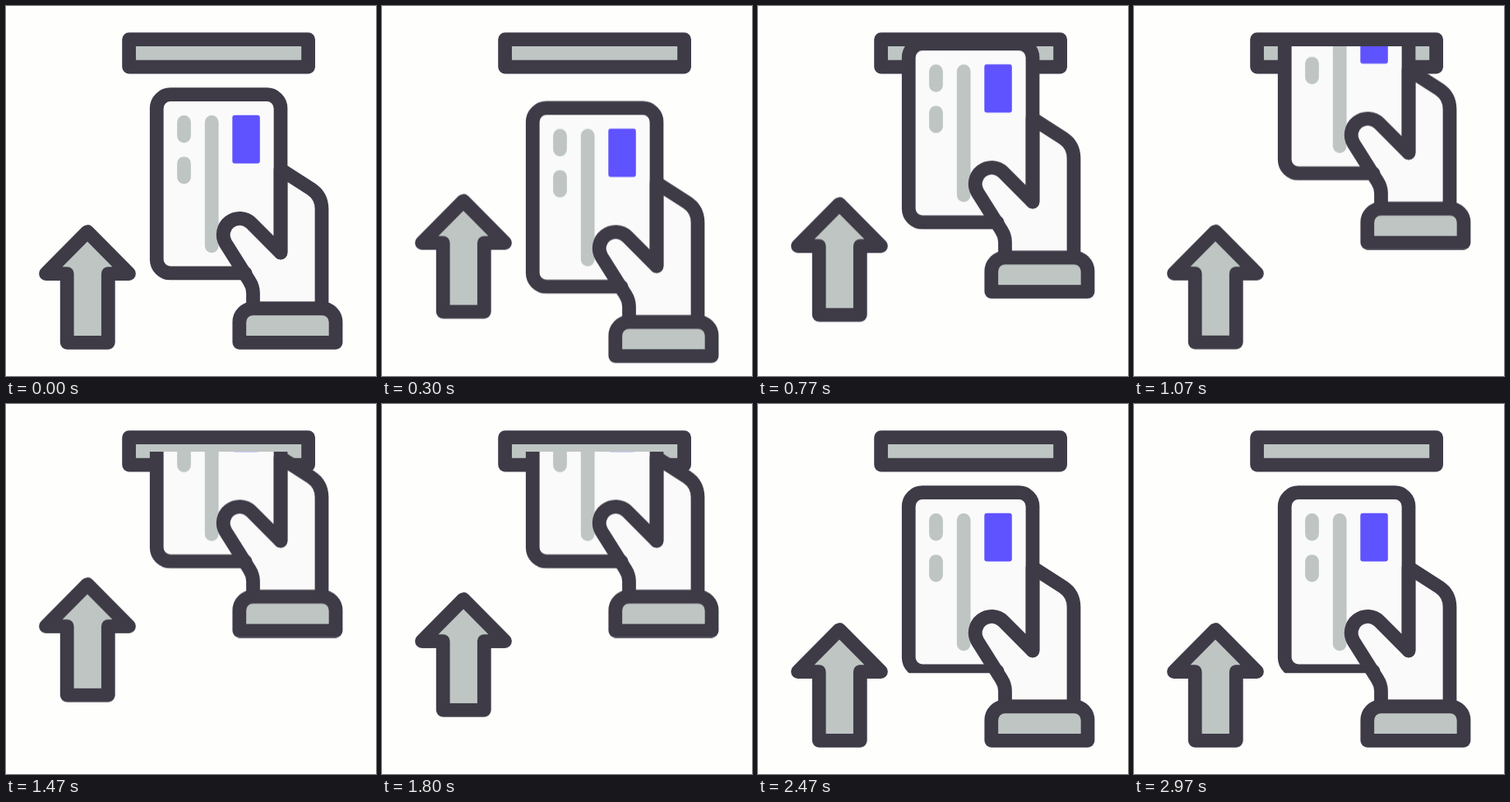
An HTML page that plays this animation: 450x450 px, repeating every 3000 ms.

```html
<!DOCTYPE html>
<html lang="en">
<head>
<meta charset="utf-8">
<title>Insert card</title>
<style>
  :root {
    --ink: #3e3b47;
    --sage: #bec5c3;
    --cream: #fafafb;
    --violet: #5f52ff;
    --ease: cubic-bezier(.333, 0, .667, 1);
  }
  html, body {
    margin: 0;
    width: 100%;
    height: 100%;
    overflow: hidden;
    background: #fefefd;
  }
  svg { display: block; width: 100vw; height: 100vh; }

  .line {
    stroke: var(--ink);
    stroke-width: 16.75;
    stroke-linecap: round;
    stroke-linejoin: round;
  }
  .sage { fill: var(--sage); }
  .cream { fill: var(--cream); }
  .open { fill: none; }
  .marks {
    fill: none;
    stroke: var(--sage);
    stroke-width: 16.75;
    stroke-linecap: round;
  }

  .arrow, .ride, .mouth, .hem { animation: 3s infinite var(--ease); }
  .arrow { animation-name: nudge; }
  .ride  { animation-name: ride; }
  .mouth { animation-name: mouth; }
  .hem   { animation-name: hem; }

  @keyframes nudge {
    0%, 35%, 70%, 100% { transform: translateY(0); }
    17.5%, 52.5% { transform: translateY(-61.5px); }
  }
  /* dip, push into the slot, rest, pull out */
  @keyframes ride {
    0% { transform: translateY(0); }
    9.1% { transform: translateY(16.75px); }
    41.3%, 65.9% { transform: translateY(-133.5px); }
    82.3%, 100% { transform: translateY(0); }
  }
  @keyframes mouth {
    0%, 35.7%, 71.3%, 100% { transform: translateY(0); }
    41.3%, 65.9% { transform: translateY(8.5px); }
  }
  @keyframes hem {
    0%, 71.3% { transform: translateY(20px); }
    80%, 100% { transform: translateY(0); }
  }
</style>
</head>
<body>
<svg viewBox="0 0 450 450">
  <defs>
    <clipPath id="mouth"><rect class="mouth" y="49" width="450" height="430"/></clipPath>
    <clipPath id="hem"><rect class="hem" y="-300" width="450" height="627.3"/></clipPath>
    <path id="card" d="M334 300V124.4a16.75 16.75 0 0 0-16.75-16.75H200a16.75 16.75 0 0 0-16.75 16.75V308.2a16.75 16.75 0 0 0 16.75 16.75H291"/>
  </defs>

  <path class="arrow line sage" d="M99 274.5L149.5 325.5H124.3V409.3H74.2V325.5H48.5Z"/>

  <rect class="line sage" x="149.6" y="40.6" width="218" height="33.4"/>

  <g clip-path="url(#mouth)">
    <g class="ride">
      <use href="#card" class="cream"/>
      <path class="marks" d="M216.5 141.3V158M216.5 191.5V208.2M250.2 141.3V291.8"/>
      <rect x="275.3" y="132.8" width="33.5" height="58.6" rx="3" fill="var(--violet)"/>

      <path class="line cream" d="M334 300V198.8L371 222.5Q384 231 384 247V368H300.5V349Q300.5 341.5 296 334.5L267 288.5A20 20 0 0 1 298.1 263.9Z"/>
      <path class="line sage" d="M283.8 409.3V384.5a16.75 16.75 0 0 1 16.75-16.75H384.3a16.75 16.75 0 0 1 16.75 16.75V409.3Z"/>

      <g clip-path="url(#hem)"><use href="#card" class="line open"/></g>
    </g>
  </g>
</svg>
</body>
</html>
```
